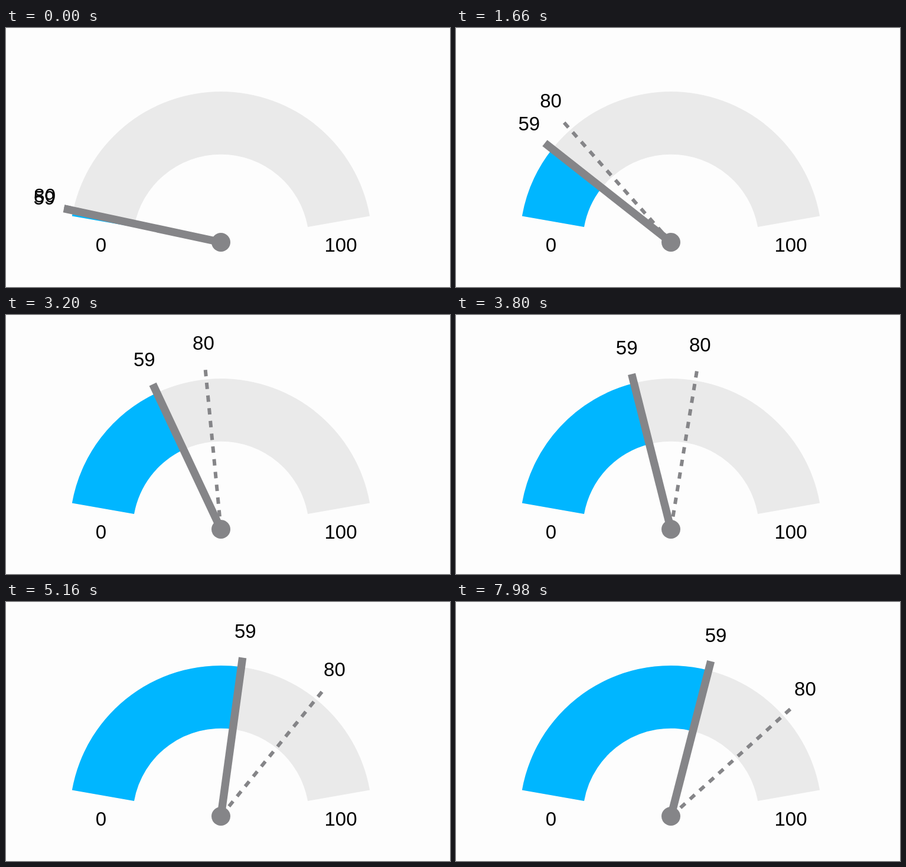
These frames come from a looping animation (752 px wide and 440 px high, 8000 ms). An HTML page:

```html
<!DOCTYPE html>
<html lang="en">
<head>
<meta charset="utf-8">
<title>Gauge</title>
<style>
  html, body { margin: 0; width: 100%; height: 100%; overflow: hidden; background: #fdfdfd; }
  svg { display: block; width: 752px; height: 440px; }
  text { font: 33px "Liberation Sans", Arial, sans-serif; text-anchor: middle; fill: #000; }
</style>
</head>
<body>
<svg viewBox="0 0 752 440">
  <g transform="translate(364 364)">
    <path id="track" fill="#eaeaea"/>
    <path id="fill" fill="#00b6ff"/>
    <line id="target" stroke="#858588" stroke-width="6" stroke-dasharray="10.88"/>
    <line id="needle" stroke="#858588" stroke-width="13.3"/>
    <circle r="16" fill="#858588"/>
    <text x="-203" y="16">0</text>
    <text x="203" y="16">100</text>
    <text id="targetLabel">80</text>
    <text id="needleLabel">59</text>
  </g>
</svg>
<script>
  const LOOP = 8000, OUTER = 256, INNER = 149.3, TIP = 272, LABEL = 306;
  const START = -80, SPAN = 160, VALUE = 0.59, TARGET = 0.8;
  // progress in ticks (of 120) by step number
  const KEYS = [[0, 2.7], [17, 20], [22, 22.65], [34, 34.8], [49, 51.8],
                [52, 55.1], [68, 69.8], [97, 98.6], [118.5, 120]];
  const el = id => document.getElementById(id);

  // point at a given angle in degrees, clockwise from straight up
  function polar(r, deg) {
    const a = deg * Math.PI / 180;
    return [r * Math.sin(a), -r * Math.cos(a)];
  }

  function band(from, to) {
    return `M${polar(OUTER, from)}A${OUTER} ${OUTER} 0 0 1 ${polar(OUTER, to)}` +
           `L${polar(INNER, to)}A${INNER} ${INNER} 0 0 0 ${polar(INNER, from)}Z`;
  }

  // steps last 100, 20 and 20 ms in turn
  function stepAt(ms) {
    const u = ms + 120, r = u % 140;
    return 3 * Math.floor(u / 140) + (r < 100 ? 0 : r < 120 ? 1 : 2) - 2;
  }

  function progress(step) {
    const i = KEYS.findIndex(key => key[0] > step);
    if (i < 0) return 1;
    const [a, va] = KEYS[i - 1], [b, vb] = KEYS[i];
    return (va + (vb - va) * (step - a) / (b - a)) / 120;
  }

  function place(id, deg) {
    const [x, y] = polar(TIP, deg), [lx, ly] = polar(LABEL, deg);
    const line = el(id), label = el(id + "Label");
    line.setAttribute("x2", x);
    line.setAttribute("y2", y);
    label.setAttribute("x", lx);
    label.setAttribute("y", ly);
  }

  function draw(ms) {
    const p = progress(stepAt(ms));
    const deg = START + SPAN * VALUE * p;
    el("fill").setAttribute("d", band(START, deg));
    place("needle", deg);
    place("target", START + SPAN * TARGET * p);
  }

  el("track").setAttribute("d", band(START, START + SPAN));
  const t0 = performance.now();
  function tick() {
    draw((performance.now() - t0) % LOOP);
    requestAnimationFrame(tick);
  }
  tick();
</script>
</body>
</html>
```
